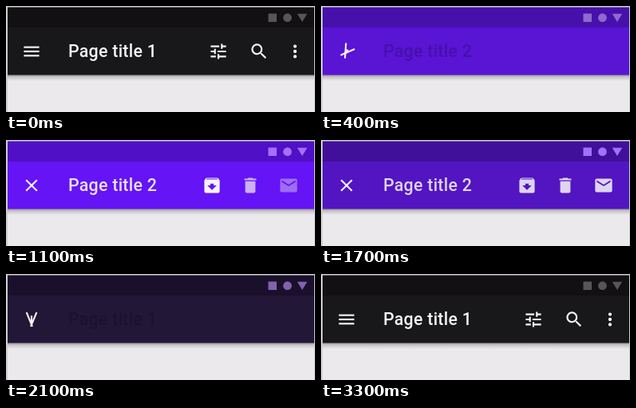
An HTML page with a canvas that plays this animation: 387x133 px, repeating every 4 s.

```html
<!DOCTYPE html>
<html lang="en">
<head>
<meta charset="utf-8">
<title>App bar transition</title>
<style>
  html, body { margin: 0; width: 100%; height: 100%; overflow: hidden; background: #ebe9eb; }
  canvas { position: absolute; left: 0; top: 0; width: 387px; height: 133px; }
  #title {
    position: absolute; left: 78px; top: 45px;
    font: 500 21.33px/24px Roboto, Arial, sans-serif;
    letter-spacing: .27px; white-space: pre;
  }
</style>
</head>
<body>
<canvas id="stage"></canvas>
<div id="title">Page title 1</div>
<script>
const W = 387, H = 133, LOOP = 4000, STEP = 100, DP = 1.067;
const canvas = document.getElementById('stage');
const title = document.getElementById('title');
const ctx = canvas.getContext('2d');
const ratio = window.devicePixelRatio || 1;
canvas.width = W * ratio;
canvas.height = H * ratio;

const BAR = [[24, 23, 25], [100, 20, 245]];
const STATUS = [[18, 16, 19], [80, 16, 197]];
const SHAPES = [[86, 85, 87], [164, 112, 250]];
const INK = [246, 243, 248];

// 24-unit icon shapes
const icons = {
  tune: 'M3 17v2h6v-2H3zM3 5v2h10V5H3zm10 16v-2h8v-2h-8v-2h-2v6h2zM7 9v2H3v2h4v2h2V9H7zm14 4v-2H11v2h10zm-6-4h2V7h4V5h-4V3h-2v6z',
  search: 'M15.5 14h-.8l-.3-.3A6.5 6.5 0 1 0 13.7 14.4l.3.3v.8l5 5 1.5-1.5zM9.5 14a4.5 4.5 0 1 1 0-9 4.5 4.5 0 0 1 0 9z',
  more: 'M10 6a2 2 0 1 0 4 0 2 2 0 1 0-4 0zM10 12a2 2 0 1 0 4 0 2 2 0 1 0-4 0zM10 18a2 2 0 1 0 4 0 2 2 0 1 0-4 0z',
  archive: 'M20.5 5.2l-1.4-1.7Q18.7 3 18 3H6Q5.3 3 4.8 3.5L3.5 5.2Q3 5.8 3 6.5V19a2 2 0 0 0 2 2h14a2 2 0 0 0 2-2V6.5Q21 5.8 20.5 5.2zM12 17.5L6.5 12H10v-2h4v2h3.5zM5.1 5l.8-1h12l.9 1z',
  trash: 'M6 19a2 2 0 0 0 2 2h8a2 2 0 0 0 2-2V7H6zM19 4h-3.5l-1-1h-5l-1 1H5v2h14z',
  mail: 'M20 4H4a2 2 0 0 0-2 2v12a2 2 0 0 0 2 2h16a2 2 0 0 0 2-2V6a2 2 0 0 0-2-2zm0 4l-8 5-8-5V6l8 5 8-5z'
};
for (const name in icons) icons[name] = new Path2D(icons[name]);

const pages = [
  { text: 'Page title 1', start: 2233, actions: [['tune', 266], ['search', 317], ['more', 362]] },
  { text: 'Page title 2', start: 433, actions: [['archive', 258], ['trash', 306], ['mail', 354]] }
];

const clamp = x => Math.min(1, Math.max(0, x));
const ramp = (t, start, span) => clamp((t - start) / span);
const easeOut = x => 1 - (1 - x) ** 2;
const mix = (a, b, p) => a.map((v, i) => v + (b[i] - v) * p);
const rgb = c => `rgb(${c.map(Math.round).join(',')})`;
const tint = (pair, p) => rgb(mix(pair[0], pair[1], p));

// cubic-bezier(.4, 0, .2, 1)
function standard(x) {
  if (x <= 0 || x >= 1) return clamp(x);
  let lo = 0, hi = 1, u;
  for (let i = 0; i < 24; i++) {
    u = (lo + hi) / 2;
    const bx = 1.2 * u * (1 - u) ** 2 + .6 * u * u * (1 - u) + u ** 3;
    if (bx < x) lo = u; else hi = u;
  }
  return u * u * (3 - 2 * u);
}

function keyed(t, keys) {
  for (let i = 1; i < keys.length; i++) {
    const [t0, a] = keys[i - 1], [t1, b] = keys[i];
    if (t <= t1) return a + (b - a) * (t - t0) / (t1 - t0);
  }
  return keys[keys.length - 1][1];
}

// 1 is full ink, 0 blends into the bar, below 0 is darker than the bar
const titleLevel = t => t < 1600
  ? keyed(t, [[0, 1], [300, 0], [400, -.2], [800, .62], [1000, .9], [1500, 1]])
  : keyed(t, [[1600, 1], [1700, .86], [2000, 0], [2100, -.2], [2500, .62], [2800, 1]]);

function drawIcon(name, x, alpha) {
  if (alpha <= 0) return;
  ctx.save();
  ctx.globalAlpha = alpha;
  ctx.translate(x, 57);
  ctx.scale(DP, DP);
  ctx.translate(-12, -12);
  ctx.fillStyle = rgb(INK);
  ctx.fill(icons[name], 'evenodd');
  ctx.restore();
}

function drawNav(t) {
  const back = t >= 1600;
  const p = standard(back ? ramp(t, 1780, 913) : ramp(t, 0, 900));
  const open = back ? 1 - p : p;
  const turn = Math.PI * (back ? 1 + p : p);
  const tilt = Math.PI / 4 * open * (back ? -1 : 1);
  const line = (y, angle, length) => {
    ctx.save();
    ctx.translate(0, y);
    ctx.rotate(angle);
    ctx.fillRect(-length / 2, -1, length, 2);
    ctx.restore();
  };
  ctx.save();
  ctx.translate(32, 57);
  ctx.scale(DP, DP);
  ctx.rotate(turn);
  ctx.fillStyle = rgb(INK);
  line(-5 * (1 - open), tilt, 18);
  line(5 * (1 - open), -tilt, 18);
  if (open < 1) line(0, 0, 18 * (1 - open));
  ctx.restore();
}

function drawStatus(color) {
  ctx.fillStyle = color;
  ctx.fillRect(328.5, 9.5, 10.5, 10.5);
  ctx.beginPath();
  ctx.arc(352.5, 14.7, 5.4, 0, 2 * Math.PI);
  ctx.fill();
  ctx.beginPath();
  ctx.moveTo(364.8, 9.7);
  ctx.lineTo(377.2, 9.7);
  ctx.lineTo(371, 20);
  ctx.fill();
}

function render(t) {
  const back = t >= 1600;
  const hue = back ? 1 - easeOut(ramp(t, 1600, 800)) : easeOut(ramp(t, 0, 650));
  const shapeHue = back ? 1 - ramp(t, 1750, 750) : ramp(t, 0, 550);
  const level = titleLevel(t);
  const bar = mix(BAR[0], BAR[1], hue);

  ctx.setTransform(ratio, 0, 0, ratio, 0, 0);
  ctx.fillStyle = '#cfcdcf';
  ctx.fillRect(0, 0, W, H);
  ctx.fillStyle = '#ebe9eb';
  ctx.fillRect(2, 1.5, 384, H);

  const shade = ctx.createLinearGradient(0, 86, 0, 94);
  shade.addColorStop(0, 'rgba(0,0,0,.42)');
  shade.addColorStop(.35, 'rgba(0,0,0,.17)');
  shade.addColorStop(1, 'rgba(0,0,0,0)');
  ctx.fillStyle = shade;
  ctx.fillRect(2, 86, 384, 8);

  ctx.fillStyle = rgb(bar);
  ctx.fillRect(2, 27, 384, 59.5);
  ctx.fillStyle = tint(STATUS, hue);
  ctx.fillRect(2, 1.5, 384, 25.5);
  drawStatus(tint(SHAPES, shapeHue));
  drawNav(t);

  const second = t >= 350 && t < 2050;
  const page = pages[second ? 1 : 0];
  const leaving = t < 350 || (t >= 1600 && t < 2050);
  page.actions.forEach(([name, x], i) =>
    drawIcon(name, x, leaving ? clamp(level) : ramp(t, page.start + i * 200, 667)));

  if (title.textContent !== page.text) title.textContent = page.text;
  title.style.color = rgb(mix(bar, level < 0 ? [0, 0, 0] : INK, Math.abs(level)));
}

const begin = performance.now();
function tick() {
  const t = (performance.now() - begin) % LOOP;
  render(Math.floor(t / STEP) * STEP);
  requestAnimationFrame(tick);
}
tick();
</script>
</body>
</html>
```
